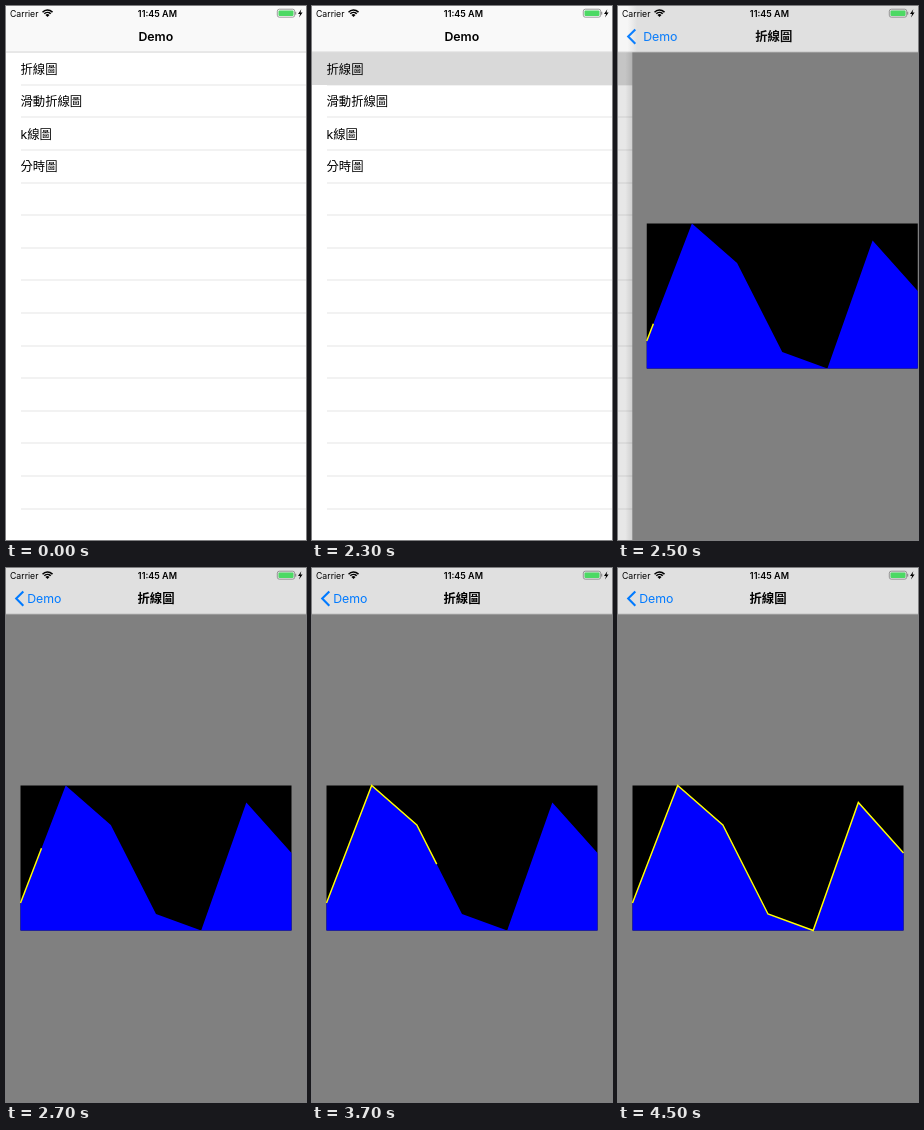
An HTML page with a canvas that plays this animation: 300 by 534 pixels, repeating every 4.6 s.

```html
<!DOCTYPE html>
<html lang="zh-Hant">
<head>
<meta charset="utf-8">
<title>Demo</title>
<style>
html, body { margin: 0; width: 100%; height: 100%; overflow: hidden; background: #fff; }
canvas { display: block; width: 300px; height: 534px; }
</style>
</head>
<body>
<canvas id="stage"></canvas>
<script>
const W = 300, H = 534, LOOP = 4600, STEP = 100;
const BAR = 46.4, ROW = 32.6, BLUE = '#007aff';
const FONT = 'Inter, "Noto Sans CJK TC", "Noto Sans CJK JP", "Noto Sans CJK", sans-serif';
const ROWS = ['折線圖', '滑動折線圖', 'k線圖', '分時圖'];
const CHART = { x: 14.5, y: 217.5, w: 271, h: 145 };
const LINE = [335, 217.5, 257, 346, 362.5, 234.5, 285]
  .map((y, i) => [CHART.x + i * CHART.w / 6, y]);
// Drawn length of the yellow line over time.
const GROWTH = [[2380, 0], [2400, 4], [2500, 18.5], [2900, 98.6], [3300, 200],
  [3700, 229.8], [3900, 476], [4200, 516], [4500, 540]];

const canvas = document.getElementById('stage');
const c = canvas.getContext('2d');
const dpr = window.devicePixelRatio || 1;
canvas.width = W * dpr;
canvas.height = H * dpr;

function rect(x, y, w, h, color) {
  c.fillStyle = color;
  c.fillRect(x, y, w, h);
}

function text(str, x, y, size, { weight = 400, color = '#000', align = 'left', alpha = 1 } = {}) {
  c.globalAlpha = alpha;
  c.font = `${weight} ${size}px ${FONT}`;
  c.fillStyle = color;
  c.textAlign = align;
  c.fillText(str, x, y);
  c.globalAlpha = 1;
}

function trace(points) {
  c.beginPath();
  points.forEach(([x, y]) => c.lineTo(x, y));
}

// Share of the push still to go: a critically damped spring.
function remaining(t) {
  const u = Math.max(0, (t - 2320) * 0.0267);
  return (1 + u) * Math.exp(-u);
}

function lineLength(t) {
  if (t <= GROWTH[0][0]) return 0;
  const i = GROWTH.findIndex(k => k[0] >= t);
  if (i < 0) return Infinity;
  const [t0, a] = GROWTH[i - 1], [t1, b] = GROWTH[i];
  return a + (b - a) * (t - t0) / (t1 - t0);
}

function cutLine(length) {
  const out = [LINE[0]];
  for (let i = 1; i < LINE.length && length > 0; i++) {
    const [x0, y0] = LINE[i - 1], [x1, y1] = LINE[i];
    const d = Math.hypot(x1 - x0, y1 - y0), k = Math.min(1, length / d);
    out.push([x0 + (x1 - x0) * k, y0 + (y1 - y0) * k]);
    length -= d;
  }
  return out;
}

function drawList(selected, p) {
  c.save();
  c.translate(-90 * (1 - p), 0);
  rect(0, 0, W + 90, H, '#fff');
  for (let i = 0; i < 14; i++) {
    rect(15, Math.floor(79.2 + i * ROW) - 0.5, W, 1, '#e5e5e6');
  }
  if (selected) rect(0, BAR, W, 79 - BAR, '#d9d9d9');
  ROWS.forEach((s, i) => text(s, 14.5, 67.6 + i * ROW, 12.35));
  c.restore();
  rect(0, 0, W, H, `rgba(0,0,0,${0.1 * (1 - p)})`);
}

function drawChart(t, p) {
  const x = W * p, { x: cx, y: cy, w, h } = CHART;
  if (p > 0.001) {
    const g = c.createLinearGradient(x - 7, 0, x, 0);
    g.addColorStop(0, 'rgba(0,0,0,0)');
    g.addColorStop(1, 'rgba(0,0,0,0.1)');
    rect(x - 7, 0, 7, H, g);
  }
  c.save();
  c.translate(x, 0);
  rect(0, 0, W, H, '#808080');
  rect(cx, cy, w, h, '#000');
  trace([...LINE, [cx + w, cy + h], [cx, cy + h]]);
  c.fillStyle = '#00f';
  c.fill();
  const length = lineLength(t);
  if (length > 0) {
    trace(cutLine(length));
    c.strokeStyle = '#ff0';
    c.lineWidth = 1.45;
    c.stroke();
  }
  c.restore();
}

function drawStatus() {
  text('Carrier', 4, 10.6, 8.7);
  text('11:45 AM', 151.4, 10.7, 9, { weight: 600, align: 'center' });

  c.strokeStyle = '#000';
  c.lineWidth = 1.5;
  for (const r of [6.8, 4.4]) {
    c.beginPath();
    c.arc(41.5, 10.8, r, -Math.PI * 0.76, -Math.PI * 0.24);
    c.stroke();
  }
  c.fillStyle = '#000';
  c.beginPath();
  c.moveTo(41.5, 11);
  c.arc(41.5, 11, 2.8, -Math.PI * 0.76, -Math.PI * 0.24);
  c.fill();

  c.strokeStyle = '#777';
  c.lineWidth = 0.7;
  c.beginPath();
  c.roundRect(271.3, 3.2, 17.4, 8, 2);
  c.stroke();
  c.fillStyle = '#4cd964';
  c.beginPath();
  c.roundRect(272.5, 4.4, 15, 5.6, 1);
  c.fill();
  rect(289.3, 5.8, 0.9, 2.8, '#777');
  trace([[295.3, 3.2], [292, 7.9], [294.1, 7.9], [293, 11.4], [296.6, 6.5], [294.5, 6.5]]);
  c.fillStyle = '#000';
  c.fill();
}

function drawBar(p) {
  let fill = '#f9f9f9';
  if (p < 1) {
    const x = W * p, soft = 25 * Math.min(1, p * 4) + 0.01;
    fill = c.createLinearGradient(x - soft, 0, x + soft, 0);
    fill.addColorStop(0, '#f6f6f6');
    fill.addColorStop(1, '#e0e0e0');
    if (p < 0.01) fill = '#e0e0e0';
  }
  rect(0, 0, W, BAR, fill);
  rect(0, BAR - 0.7, W, 0.7, 'rgba(0,0,0,0.22)');
  drawStatus();

  const slide = Math.pow(p, 1.2), shown = 1 - p;
  const back = 21.2 + Math.min(111.2, 153 * slide);
  text('Demo', back, 35, 12.35, { weight: 600, alpha: p });
  if (p === 1) return;
  text('Demo', back, 35, 12.35, { color: BLUE, alpha: shown });
  text('折線圖', 150 + 222 * slide, 35.4, 12.35, { weight: 600, align: 'center', alpha: shown });
  c.globalAlpha = shown;
  trace([[17.3, 23.4], [10.2, 30.6], [17.3, 37.8]]);
  c.strokeStyle = BLUE;
  c.lineWidth = 2.1;
  c.stroke();
  c.globalAlpha = 1;
}

function draw(t) {
  const raw = remaining(t), p = raw < 0.001 ? 0 : raw;
  c.setTransform(dpr, 0, 0, dpr, 0, 0);
  if (p > 0) drawList(t >= 2200, p);
  if (p < 1) drawChart(t, p);
  drawBar(p);
}

function tick() {
  const t = performance.now() % LOOP;
  draw(Math.floor(t / STEP) * STEP);
  requestAnimationFrame(tick);
}
tick();
</script>
</body>
</html>
```
